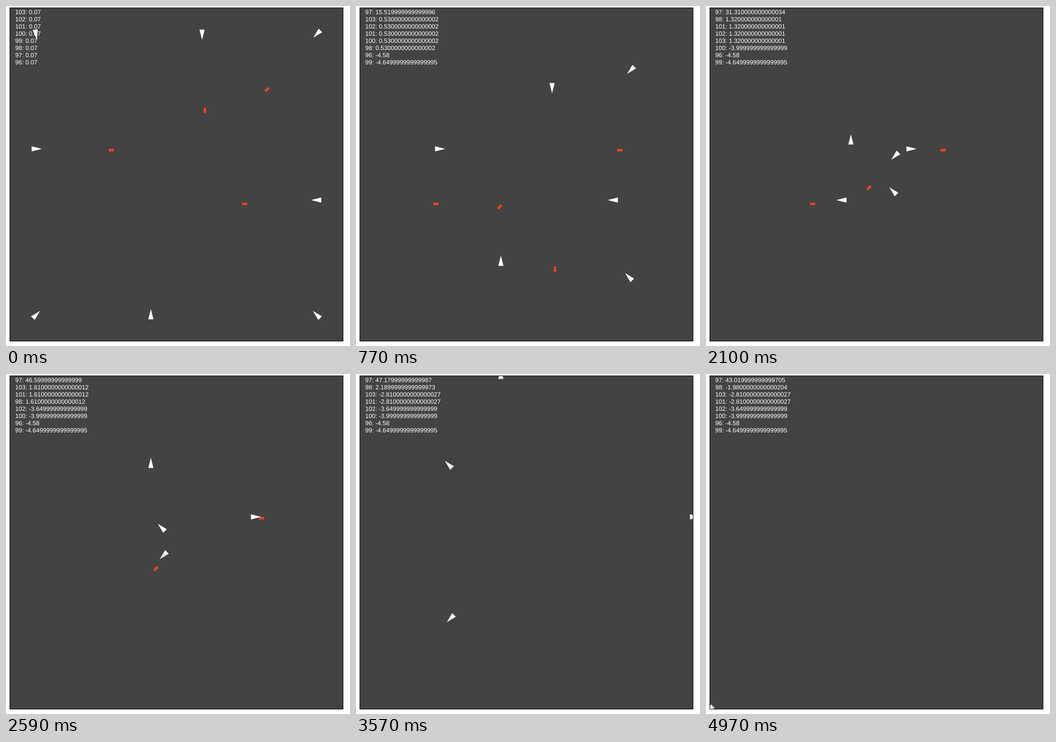
A matplotlib script that plays this animation: 672x664 px, repeating every 5.04 s.

```python
import math

import matplotlib.pyplot as plt
import numpy as np
from matplotlib.animation import FuncAnimation
from matplotlib.patches import Polygon, Rectangle

plt.rcParams["text.hinting"] = "none"
plt.rcParams["font.family"] = "Liberation Sans"

W, H, DPI = 672, 664, 100
FRAMES, INTERVAL = 72, 70
LEFT, TOP, SIZE = 8, 4, 650
RIGHT, BOTTOM = LEFT + SIZE, TOP + SIZE

ACCEL, TOP_SPEED = 0.0857, 3.0
SPIN = 5            # degrees per tick
BULLET_SPEED = 20
RELOAD = 32         # ticks between shots
KILLS = {0: 35, 3: 100.5, 4: 135}   # shot index -> tick of the hit
KILLER = 97

# id: start x, start y (inside the arena), heading, tick of death, armed
SHIPS = {
    96: (50, 50, 45, 42, False),
    97: (600, 50, 135, 303, True),
    98: (600, 600, 225, 302, False),
    99: (50, 600, 315, 35, False),
    100: (375, 50, 90, 100.5, True),
    101: (50, 275, 0, 219, True),
    102: (600, 375, 180, 135, True),
    103: (275, 600, 270, 219, False),
}
SPINNER = 96


def tick_at(frame):
    """Game tick shown in a frame; the game runs at about 60 ticks a second."""
    return round(np.interp(frame, [0, 11, 22, 30, 44, 59, 71],
                           [7, 53, 100, 132, 190, 253, 303]))


def travel(t):
    """Distance flown after t ticks: constant acceleration up to top speed."""
    t = max(t, 0)
    ramp = TOP_SPEED / ACCEL
    return ACCEL * t * t / 2 if t < ramp else TOP_SPEED * (t - ramp / 2)


def direction(deg):
    a = math.radians(deg)
    return np.array([math.cos(a), math.sin(a)])


def place(points, center, deg):
    """Rotate points given as (forward, sideways) and move them to center."""
    fwd = direction(deg)
    side = np.array([-fwd[1], fwd[0]])
    return [center + f * fwd + s * side for f, s in points]


def ship_pose(ship, t):
    x, y, deg = SHIPS[ship][:3]
    pos = np.array([LEFT + x, TOP + y], float)
    if ship == SPINNER:
        for k in range(int(t)):
            step = travel(k + 1) - travel(k)
            pos += step * direction(deg + SPIN * (k + 0.5))
        return pos, deg + SPIN * t
    lag = 1.8 if ship == KILLER else 0
    return pos + travel(t - lag) * direction(deg), deg


def bullets(ship, t):
    """Centers of the bullets that a ship has in flight."""
    deg, death = SHIPS[ship][2:4]
    fwd = direction(deg)
    offset = np.array([2.5, 5]) - 2.5 * np.array([-fwd[1], fwd[0]])
    lead = 1.1 if ship == KILLER else 0
    for k in range(10):
        fired = k * RELOAD - lead if k else -0.7
        if t - fired < 1 or fired > death:
            continue
        if ship == KILLER and t > KILLS.get(k, math.inf):
            continue
        start, _ = ship_pose(ship, fired)
        pos = start + offset + (BULLET_SPEED * (t - fired) - 9) * fwd
        if LEFT <= pos[0] <= RIGHT and TOP <= pos[1] <= BOTTOM:
            yield pos


def score(ship, t):
    death = SHIPS[ship][3]
    hits = [math.ceil(k) for k in KILLS.values()] if ship == KILLER else []
    total = 0.0
    for k in range(1, int(min(t, death)) + 1):
        if not hits or k != hits[0]:
            total += 0.01
        if k in hits:
            total += 15
    return total - 5 if t >= death else total


fig = plt.figure(figsize=(W / DPI, H / DPI), dpi=DPI, facecolor="white")
ax = fig.add_axes([0, 0, 1, 1])
ax.set_xlim(0, W)
ax.set_ylim(H, 0)
ax.axis("off")

ax.add_patch(Rectangle((LEFT - 1, TOP - 1), SIZE + 2, SIZE + 2,
                       color="black", lw=0))
arena = ax.add_patch(Rectangle((LEFT, TOP), SIZE, SIZE, color="#434343", lw=0))

SHIP_SHAPE = [(10, 0), (-10, -5), (-10, 5)]
BULLET_SHAPE = [(5, -2.5), (5, 2.5), (-5, 2.5), (-5, -2.5)]


def make_shape(color, zorder):
    shape = Polygon([(0, 0)] * 3, closed=True, fc=color, lw=0, zorder=zorder)
    ax.add_patch(shape)
    shape.set_clip_path(arena)
    return shape


ship_art = {ship: make_shape("white", 4) for ship in SHIPS}
bullet_art = [make_shape("#ec4122", 3) for _ in range(12)]
rows = [ax.text(18, 16 + 14 * i, "", color="white", fontsize=12 * 72 / DPI,
                va="baseline", zorder=5) for i in range(len(SHIPS))]


def update(frame):
    t = tick_at(frame)

    for ship, art in ship_art.items():
        alive = t <= SHIPS[ship][3]
        art.set_visible(alive)
        if alive:
            art.set_xy(place(SHIP_SHAPE, *ship_pose(ship, t)))

    flying = [(pos, SHIPS[ship][2]) for ship in SHIPS if SHIPS[ship][4]
              for pos in bullets(ship, t)]
    for i, art in enumerate(bullet_art):
        art.set_visible(i < len(flying))
        if i < len(flying):
            art.set_xy(place(BULLET_SHAPE, *flying[i]))

    # The order of equal scores flips with every tick.
    tie = -1 if t % 2 else 1
    board = sorted((-score(ship, t), tie * ship, ship) for ship in SHIPS)
    for row, (neg, _, ship) in zip(rows, board):
        row.set_text(f"{ship}: {-neg!r}")

    return [*ship_art.values(), *bullet_art, *rows]


anim = FuncAnimation(fig, update, frames=FRAMES, interval=INTERVAL,
                     repeat=True, repeat_delay=0, blit=False)
plt.show()
```
